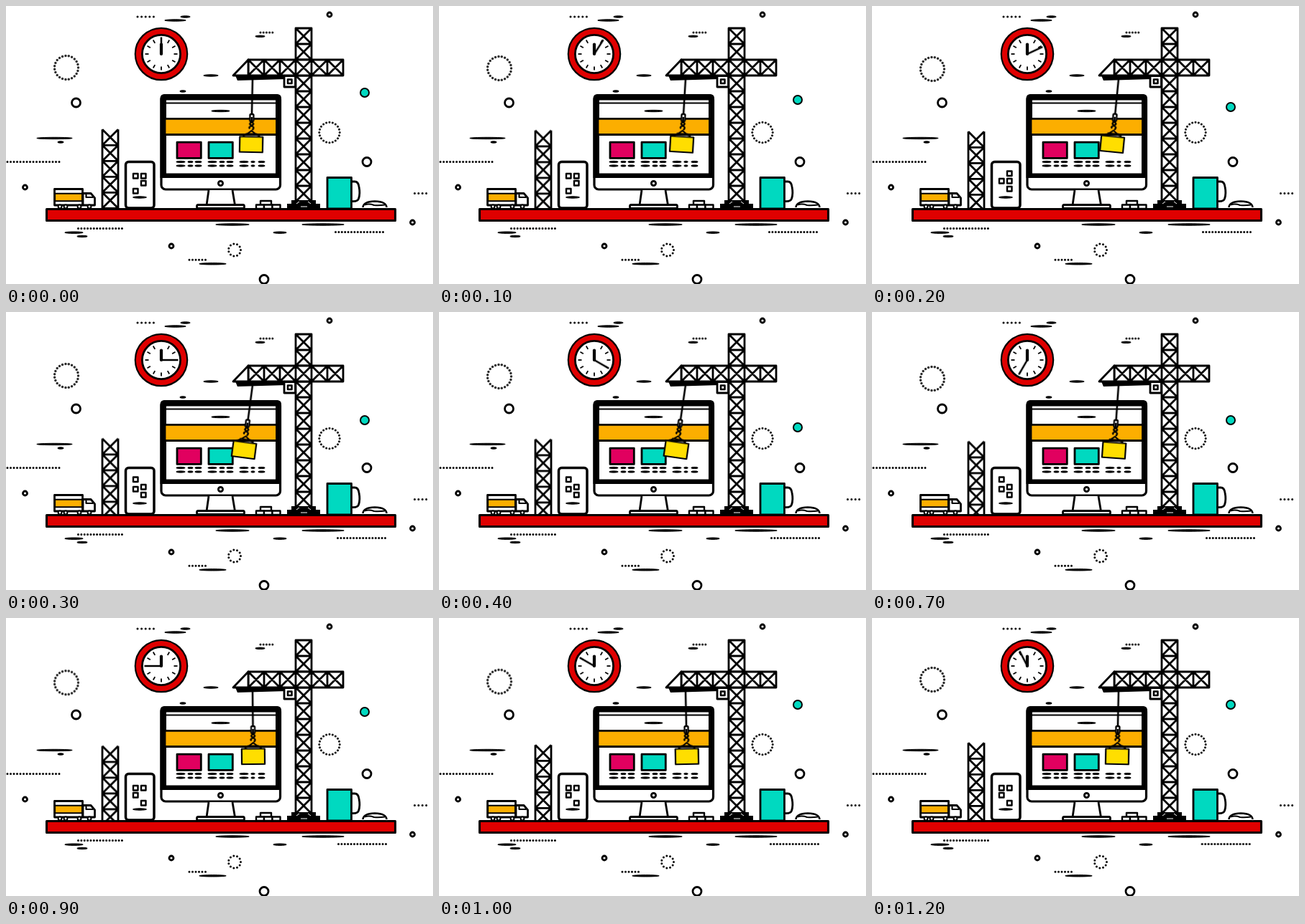
An HTML page for the animation above (1.3 s loop, 594 by 388 pixels).

```html
<!DOCTYPE html>
<html lang="en">
<head>
<meta charset="utf-8">
<title>Desk under construction</title>
<style>
  html, body { margin: 0; width: 100%; height: 100%; overflow: hidden; background: #fff; }
  svg { display: block; }
  #stage { width: 594px; height: 388px; fill: none; stroke: #000; stroke-width: 2.8; stroke-linejoin: round; }
  .white { fill: #fff; }
  .black { fill: #000; }
  .red { fill: #df0000; }
  .orange { fill: #fcae00; }
  .yellow { fill: #ffde00; }
  .pink { fill: #e1005f; }
  .teal { fill: #00d9c0; }
  .dots { stroke-linecap: round; stroke-width: 3; }
  .blob { fill: #000; stroke-width: 1; }

  /* Thirteen poses per loop, 100 ms each */
  .anim { animation: 1300ms infinite; }
  #minute { animation-name: minute; transform-origin: 216px 67px; }
  #load { animation-name: swing; transform-origin: 343px 102px; }
  #ball { animation-name: ball; }
  #ring { animation-name: ring; }
  #tower { animation-name: tower; }
  #row { animation-name: row; }
  #windows { animation-name: windows; animation-timing-function: step-end; }

  @keyframes minute {
    0% { transform: rotate(0deg); animation-timing-function: steps(2); }
    15.38% { transform: rotate(65deg); animation-timing-function: steps(1); }
    23.07% { transform: rotate(90deg); animation-timing-function: steps(7); }
    76.92% { transform: rotate(300deg); animation-timing-function: steps(2); }
    92.3%, 100% { transform: rotate(333deg); }
  }
  @keyframes swing {
    0% { transform: rotate(1.2deg); animation-timing-function: steps(2); }
    15.38% { transform: rotate(5.6deg); animation-timing-function: steps(1); }
    23.07% { transform: rotate(7.5deg); animation-timing-function: steps(1); }
    30.76% { transform: rotate(8.2deg); animation-timing-function: steps(1); }
    38.46% { transform: rotate(7.5deg); animation-timing-function: steps(2); }
    53.84% { transform: rotate(4deg); animation-timing-function: steps(2); }
    69.23% { transform: rotate(-.6deg); animation-timing-function: steps(1); }
    76.92% { transform: rotate(-1.2deg); animation-timing-function: steps(2); }
    92.3%, 100% { transform: rotate(1.2deg); }
  }
  @keyframes ball {
    0% { transform: translateY(0); animation-timing-function: steps(5); }
    38.46% { transform: translateY(50px); animation-timing-function: steps(5); }
    76.92%, 100% { transform: translateY(0); }
  }
  @keyframes ring {
    0% { transform: translateY(0); animation-timing-function: steps(7); }
    53.84% { transform: translateY(7px); animation-timing-function: steps(5); }
    92.3%, 100% { transform: translateY(0); }
  }
  @keyframes tower {
    0% { transform: translateY(0); animation-timing-function: steps(3); }
    23.07% { transform: translateY(4.5px); animation-timing-function: steps(4); }
    53.84% { transform: translateY(8.5px); animation-timing-function: steps(2); }
    69.23% { transform: translateY(6.5px); animation-timing-function: steps(3); }
    92.3%, 100% { transform: translateY(2px); }
  }
  @keyframes row {
    0% { transform: translateX(0); animation-timing-function: steps(7); }
    53.84% { transform: translateX(7px); animation-timing-function: steps(2); }
    69.23% { transform: translateX(4px); animation-timing-function: steps(3); }
    92.3%, 100% { transform: translateX(.7px); }
  }
  @keyframes windows {
    0% { transform: translateX(0); }
    15.38% { transform: translateX(-40px); }
    23.07% { transform: translateX(-80px); }
    38.46% { transform: translateX(-120px); }
    53.84% { transform: translateX(-80px); }
    69.23%, 100% { transform: translateX(-120px); }
  }
</style>
</head>
<body>
<svg id="stage" viewBox="0 0 594 388">
  <g id="blobs"></g>
  <g id="rows" class="dots"></g>
  <g id="circles"></g>
  <g id="rings" class="dots"></g>
  <circle id="ball" class="anim teal" cx="499" cy="121" r="6" stroke-width="2"/>

  <g id="clock">
    <circle class="red" cx="216" cy="67" r="36.2" stroke-width="2.2"/>
    <circle class="white" cx="216" cy="67" r="26.6"/>
    <g id="ticks" stroke-width="1.8"></g>
    <path d="M216 67V53.500" stroke-width="4.2" stroke-linecap="round"/>
    <path id="minute" class="anim" d="M216 67.500V43.500" stroke-width="2.5"/>
  </g>

  <g id="monitor">
    <rect class="white" x="216" y="124.500" width="165.500" height="131.500" rx="6" stroke-width="3.2"/>
    <path class="black" stroke="none" d="M214.500 240V129q0-6 6-6H377q6 0 6 6V240Z"/>
    <rect class="white" x="223" y="131.500" width="152" height="102" stroke="none"/>
    <path d="M222 135.500H376" stroke-width="2.2"/>
    <rect class="orange" x="221" y="157.300" width="155.500" height="22.200"/>
    <rect class="pink" x="238" y="190.200" width="33.300" height="22.200"/>
    <rect class="teal" x="282" y="190.200" width="33.300" height="22.200"/>
    <circle class="white" cx="298.500" cy="247.500" r="3.100"/>
    <path class="white" d="M282 257L279 278H318.500L315 257"/>
    <rect class="white" x="265.500" y="277.500" width="66" height="5" rx="2"/>
    <g id="copy"></g>
  </g>

  <g id="crane">
    <path id="mast" class="white"/>
    <path id="jib" class="white"/>
    <path class="white" d="M337 75L316 97H337Z"/>
    <path class="black" stroke="none" d="M319 97H390V102L322 104Z"/>
    <rect class="white" x="387" y="97.500" width="15.500" height="15.500"/>
    <rect x="392" y="102.500" width="5.500" height="5.500" stroke-width="2.500"/>
    <path class="black" stroke="none" d="M397 271H431V276H437V283H391V276H397Z"/>
    <path d="M404 276L408 273M420 273L424 276M410 280H419" stroke="#fff" stroke-width="1"/>
  </g>
  <g id="load" class="anim">
    <path d="M343 103V151" stroke-width="2.600"/>
    <rect class="white" x="340.500" y="151" width="5" height="10" rx="1.500" stroke-width="2.300"/>
    <path d="M343 155V162M343 162q-5 2.500 0 5t1 6M343 162q5 2.500 0 5t-2 4" stroke-width="2.400"/>
    <path d="M331 181.500Q336 180 343 174Q350 180 355 181.500M335 178.500H351" stroke-width="2"/>
    <rect class="yellow" x="327" y="182.500" width="32" height="21.500" stroke-width="2.200"/>
  </g>

  <path id="tower" class="anim"/>

  <rect class="white" x="166.500" y="217.500" width="39.500" height="64.500" rx="4" stroke-width="3.500"/>
  <ellipse class="blob" cx="186" cy="267" rx="9.500" ry="1.200"/>
  <svg x="172" y="227" width="28" height="37"><g id="windows" class="anim" stroke-width="2.400"></g></svg>

  <g id="truck">
    <rect class="white" x="67.500" y="255.500" width="39" height="22.500"/>
    <rect class="orange" x="68" y="261.800" width="38" height="10.500" stroke-width="2.100"/>
    <path class="white" d="M107 261.500H118L123.500 268V278H107Z"/>
    <path class="white" d="M111.500 262V267H121" stroke-width="2.200"/>
    <g class="white" stroke-width="2">
      <circle cx="75" cy="280" r="2.400"/><circle cx="83" cy="280" r="2.400"/>
      <circle cx="102" cy="280" r="2.400"/><circle cx="116" cy="280" r="2.400"/>
    </g>
  </g>

  <g id="blocks" class="white" stroke-width="2.400">
    <rect x="354" y="272" width="15" height="6"/>
    <rect x="348" y="277.500" width="11" height="5.500"/>
    <rect x="359" y="277.500" width="11.500" height="5.500"/>
    <rect x="370.500" y="277.500" width="11" height="5.500"/>
  </g>

  <rect class="teal" x="447" y="239.500" width="33.500" height="43.500"/>
  <path d="M481 245H485Q490 245 491 252Q493 262 490.500 269Q489 273 482 272.500"/>
  <path class="white" d="M496.500 281Q497 273 513 272.500Q529 273 529.500 281" stroke-width="2.500"/>
  <path d="M499 277.500Q505 275.500 512 278Q520 278.500 527 277.500" stroke-width="2"/>

  <rect class="red" x="56.500" y="283.500" width="485" height="16" stroke-width="3.100"/>
</svg>
<script>
  const $ = id => document.getElementById(id);

  function add(parent, tag, attrs) {
    const el = document.createElementNS('http://www.w3.org/2000/svg', tag);
    for (const key in attrs) el.setAttribute(key, attrs[key]);
    return $(parent).appendChild(el);
  }

  const blob = (parent, x1, x2, y, ry) =>
    add(parent, 'ellipse', { class: 'blob', cx: (x1 + x2) / 2, cy: y, rx: (x2 - x1) / 2 - .8, ry });

  // Square cells crossed by diagonals, going down or to the right
  function lattice(x, y, size, count, across, openTop) {
    let d = '';
    for (let i = 0; i < count; i++) {
      const l = x + (across ? i * size : 0), t = y + (across ? 0 : i * size);
      const r = l + 22, b = t + 22;
      d += `M${l} ${t}V${b}H${r}V${t}`;
      if (!openTop || i) d += 'Z';
      d += `M${l} ${t}L${r} ${b}M${r} ${t}L${l} ${b}`;
    }
    return d;
  }
  $('mast').setAttribute('d', lattice(403, 31, 22, 11));
  $('jib').setAttribute('d', lattice(337, 75, 22, 6, true));
  $('tower').setAttribute('d', lattice(134, 172.300, 22, 5, false, true));

  for (let a = 30; a < 360; a += 30)
    add('ticks', 'path', { d: 'M216 44.500V49.500', transform: `rotate(${a} 216 67)` });

  [[220, 251, 20], [242, 257, 15], [346, 361, 42.300], [274, 296, 97], [241, 251, 119],
   [42, 93, 184.500], [71, 81, 190], [81, 108, 316.200], [98, 114, 321.500], [291, 339, 305],
   [371, 391, 316.200], [411, 471, 305], [268, 307, 359.800]
  ].forEach(([x1, x2, y]) => blob('blobs', x1, x2, y, 1.200));

  blob('copy', 285, 312, 146.500, 1.200);
  for (const y of [217.500, 223])
    [[236, 250], [252, 261], [262, 273], [280, 294], [296, 305], [306, 317],
     [324, 338], [340, 347], [350, 361]
    ].forEach(([x1, x2]) => blob('copy', x1, x2, y, 1.100));

  function dotRow(x, y, count, gap) {
    return add('rows', 'path', {
      d: `M${x} ${y}h${(count - 1) * gap + .1}`, 'stroke-dasharray': `0 ${gap}`
    });
  }
  dotRow(183, 15, 5, 5.600);
  dotRow(354, 37, 5, 4.200);
  dotRow(2, 217.500, 17, 4.500);
  dotRow(100.500, 310.500, 15, 4.350);
  dotRow(255, 354.300, 6, 4.500);
  dotRow(568.500, 261.500, 4, 5.400);
  const row = dotRow(458.500, 315.500, 16, 4.400);
  row.id = 'row';
  row.setAttribute('class', 'anim');

  [[450, 12, 3], [97.500, 135, 6], [26.500, 253, 3], [502, 217.500, 6],
   [565.500, 302, 3], [230, 335, 3], [359, 381.500, 6]
  ].forEach(([cx, cy, r]) => add('circles', 'circle', { cx, cy, r }));

  const dotRing = (cx, cy, r, count, attrs) =>
    add('rings', 'circle', { cx, cy, r, pathLength: count, 'stroke-dasharray': '0 1', ...attrs });
  dotRing(84, 86, 16.500, 23, { id: 'ring', class: 'anim', stroke: '#2a2a2a', 'stroke-width': 3.500 });
  dotRing(450, 176.500, 14.200, 20);
  dotRing(318, 340.500, 8.500, 11);

  // Window layouts side by side, each as [column, y]
  [[[0, 7], [1, 7], [1, 17], [0, 28]],
   [[1, 3.500], [0, 14], [1, 14], [1, 25]],
   [[0, 3.500], [1, 14], [0, 17], [1, 25]],
   [[0, 7], [1, 7], [0, 17], [1, 28]]
  ].forEach((layout, i) => layout.forEach(([col, y]) =>
    add('windows', 'rect', { x: 5 + col * 11 + i * 40, y, width: 6.500, height: 6.500 })));
</script>
</body>
</html>
```
